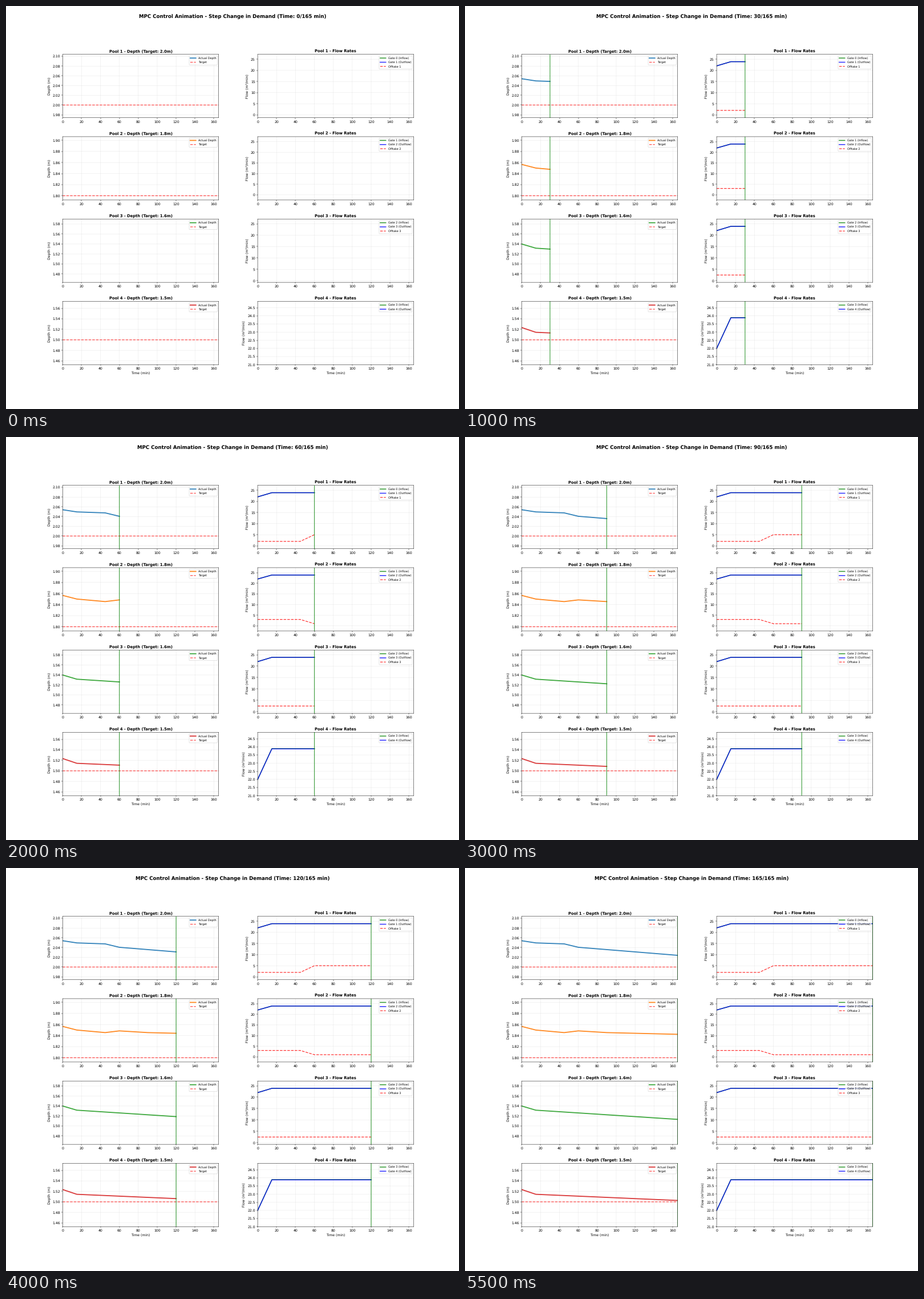
Write a matplotlib script that moves like this. It is 794 px wide and 706 px high and loops after 6 s.

```python
import numpy as np
import matplotlib.pyplot as plt
from matplotlib.animation import FuncAnimation

plt.rcParams.update({
    "font.family": "DejaVu Sans",
    "path.snap": False,
    "text.hinting": "none",
})

DPI = 44.125
WIDTH, HEIGHT = 794.001, 706
STEP, END = 15, 165
times = np.arange(0, END + STEP, STEP)

# target depth, colour, corner times and depths of each pool
POOLS = [
    (2.0, "tab:blue", [0, 15, 45, 60, 165], [2.054, 2.0495, 2.0475, 2.0405, 2.024]),
    (1.8, "tab:orange", [0, 15, 45, 60, 90, 165],
     [1.8566, 1.85, 1.8454, 1.8485, 1.8454, 1.8423]),
    (1.6, "tab:green", [0, 15, 165], [1.54, 1.5316, 1.5132]),
    (1.5, "tab:red", [0, 15, 165], [1.5235, 1.5144, 1.5026]),
]
# offtake before and after the demand step
OFFTAKES = [(2, 5), (3, 1), (2.5, 2.5)]


def gate_flow(level):
    return np.where(times == 0, 22.0, level)


def fit_y(ax, series, least_pad):
    low, high = np.min(series), np.max(series)
    pad = max(least_pad, 0.15 * (high - low))
    ax.set_ylim(low - pad, high + pad)


def finish(ax, title, ylabel, last):
    ax.set_title(title, fontsize=11, fontweight="bold")
    ax.set_ylabel(ylabel)
    ax.set_xlim(0, END)
    ax.grid(True, alpha=0.3)
    ax.legend(loc="upper right", fontsize=8)
    if last:
        ax.set_xlabel("Time (min)")
    markers.append(ax.axvline(0, color="green", lw=2, alpha=0.7))


def add_curve(ax, data, **style):
    line, = ax.plot([], [], **style)
    curves.append((line, data))


fig, axes = plt.subplots(4, 2, figsize=(WIDTH / DPI, HEIGHT / DPI), dpi=DPI)
fig.subplots_adjust(left=0.125, right=0.9, bottom=0.11, top=0.88,
                    hspace=0.3, wspace=0.25)
heading = fig.suptitle("", fontsize=14, fontweight="bold")
curves, markers = [], []

for i, (target, color, corners, values) in enumerate(POOLS):
    depth_ax, flow_ax = axes[i]
    last = i == len(POOLS) - 1

    depth = np.interp(times, corners, values)
    add_curve(depth_ax, depth, color=color, lw=3, alpha=0.9, label="Actual Depth")
    depth_ax.axhline(target, color="red", ls="--", lw=2, alpha=0.7, label="Target")
    fit_y(depth_ax, depth, 0.05)
    finish(depth_ax, f"Pool {i + 1} - Depth (Target: {target}m)", "Depth (m)", last)

    flows = [gate_flow(23.89), gate_flow(23.875)]
    add_curve(flow_ax, flows[0], color="green", lw=2.5, alpha=0.8,
              label=f"Gate {i} (Inflow)")
    add_curve(flow_ax, flows[1], color="blue", lw=2.5, alpha=0.8,
              label=f"Gate {i + 1} (Outflow)")
    if not last:
        before, after = OFFTAKES[i]
        flows.append(np.where(times < 60, before, after))
        add_curve(flow_ax, flows[2], color="red", ls="--", lw=2, alpha=0.8,
                  label=f"Offtake {i + 1}")
    fit_y(flow_ax, flows, 1.0)
    finish(flow_ax, f"Pool {i + 1} - Flow Rates", "Flow (m³/min)", last)


def update(frame):
    now = times[frame]
    heading.set_text("MPC Control Animation - Step Change in Demand "
                     f"(Time: {now}/{END} min)")
    for line, data in curves:
        line.set_data(times[:frame + 1], data[:frame + 1])
    for marker in markers:
        marker.set_xdata([now, now])
        marker.set_visible(frame > 0)
    return []


anim = FuncAnimation(fig, update, frames=len(times), init_func=lambda: update(0),
                     interval=500, repeat=True, repeat_delay=0, blit=False)
plt.show()
```
